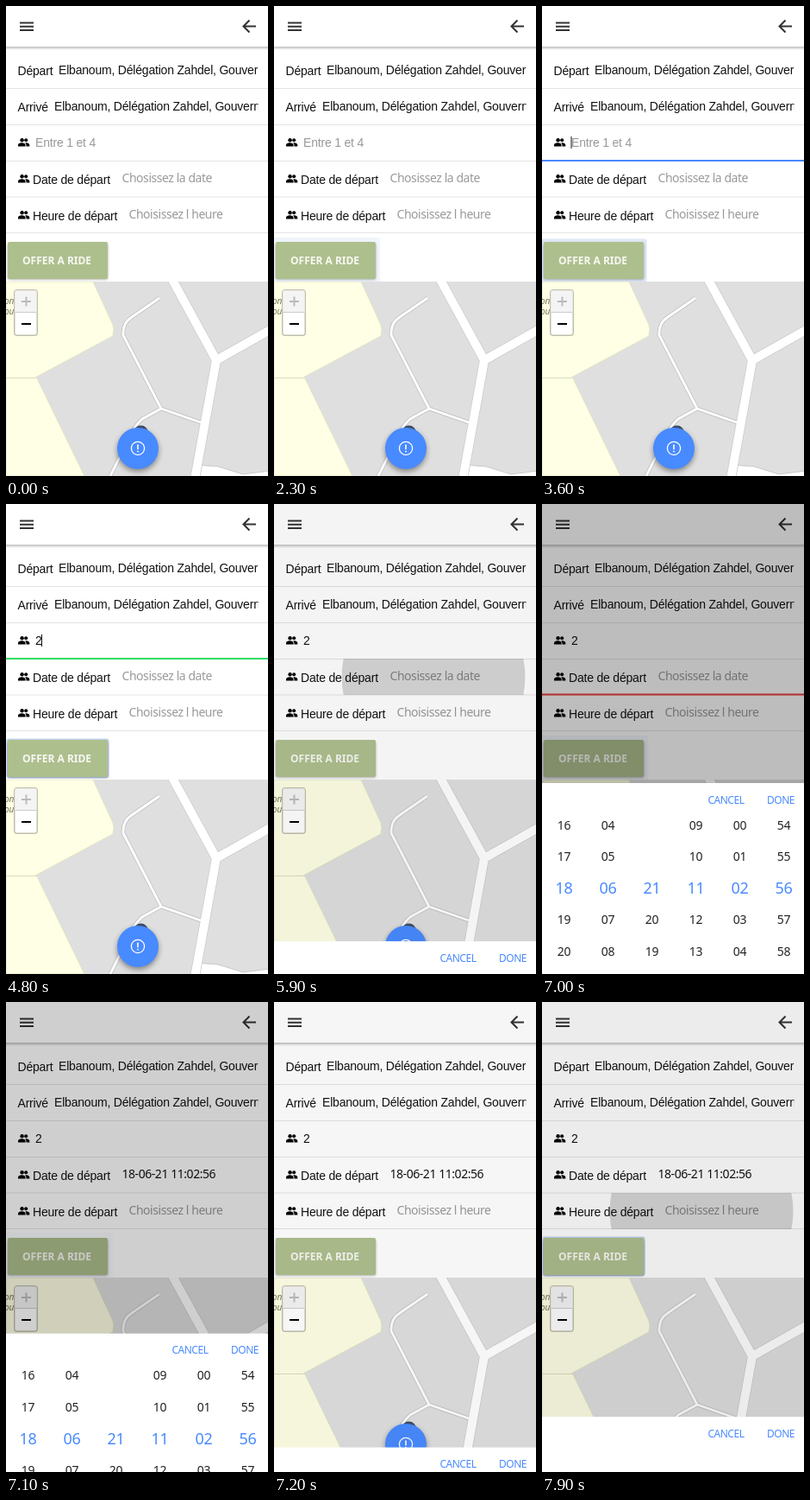
Write an HTML page that moves like this. It is 304 by 544 pixels and loops after 8000 ms.

```html
<!DOCTYPE html>
<html lang="fr">
<head>
<meta charset="utf-8">
<style>
html, body { margin: 0; width: 100%; height: 100%; overflow: hidden; background: #fff; }
svg { display: block; width: 304px; height: 544px; }
text { font: 14px "Liberation Sans", Arial, sans-serif; letter-spacing: -.2px; fill: #111; }
.noto { font: 14px "Noto Sans", sans-serif; letter-spacing: -.45px; }
.hint { fill: #999; }
.cmd { font: 500 12px "Noto Sans", sans-serif; letter-spacing: -.5px; fill: #488aff; }
.num { font: 14px "Noto Sans", sans-serif; text-anchor: middle; fill: #222; }
.num.on { font-size: 18px; font-weight: 500; fill: #488aff; }
.label { font: 600 12px "Noto Sans", sans-serif; letter-spacing: 0; fill: #f7f8f2; }
.place { font: italic 10px "Noto Sans", sans-serif; fill: #77775f; }
.road { fill: none; stroke-linejoin: round; }
</style>
</head>
<body>
<svg viewBox="0 0 304 544">
  <defs>
    <linearGradient id="fade" x2="0" y2="1">
      <stop stop-opacity=".26"/><stop offset="1" stop-opacity="0"/>
    </linearGradient>
    <filter id="soft" x="-30%" y="-30%" width="160%" height="160%"><feGaussianBlur stdDeviation="1.5"/></filter>
    <filter id="softer" x="-40%" y="-40%" width="180%" height="180%"><feGaussianBlur stdDeviation="3"/></filter>
    <clipPath id="field"><rect x="0" y="50" width="292.5" height="90"/></clipPath>
    <clipPath id="row4"><rect y="179" width="304" height="42"/></clipPath>
    <clipPath id="row5"><rect y="221" width="304" height="42"/></clipPath>
    <clipPath id="mapArea"><rect y="319" width="304" height="225"/></clipPath>
    <g id="people">
      <circle cx="4.6" cy="2.3" r="2.2"/><circle cx="9.2" cy="2.3" r="2"/>
      <path d="M0 9.5V8c0-3.8 8.6-3.8 8.6 0v1.5zM9.5 9.5V8q0-1.6-1.3-2.6c2.3-.4 5.1.4 5.1 2.4v1.7z"/>
    </g>
    <path id="lanes" d="M178 338L146 360Q135 367 136 381L180 466L226 482M180 466L158 478Q148 487 143 500L121 544"/>
    <path id="streets" d="M192 315L244 410L308 374M244 410L219 548"/>
  </defs>
  <rect width="304" height="544" fill="#fff"/>

  <g fill="none" stroke="#333" stroke-width="2">
    <path d="M16 19.5H32M16 23.8H32M16 28.1H32"/>
    <path d="M290 23.5H276M282.5 16.5L275.5 23.5L282.5 30.5"/>
  </g>
  <rect y="47" width="304" height="4" fill="url(#fade)"/>
  <path d="M0 95.5H304M0 137.5H304M0 179.5H304M0 221H304M0 262.5H304" stroke="#e4e4e4"/>

  <text x="13.5" y="80">Départ</text>
  <text x="13.5" y="122">Arrivé</text>
  <g clip-path="url(#field)">
    <text x="61" y="79">Elbanoum, Délégation Zahdel, Gouvernorat</text>
    <text x="56" y="121">Elbanoum, Délégation Zahdel, Gouvernorat</text>
  </g>
  <use href="#people" x="14" y="153"/>
  <use href="#people" x="14" y="195"/>
  <use href="#people" x="14" y="237"/>
  <text id="seats" x="34" y="163"></text>
  <path id="caret" d="M41.5 151V165" stroke="#111"/>
  <text x="31" y="206">Date de départ</text>
  <text id="date" x="134.5" y="204"></text>
  <text x="31" y="248">Heure de départ</text>
  <text class="noto hint" x="142.5" y="246">Choisissez l heure</text>
  <path id="seatLine" d="M0 179H304" stroke-width="2"/>
  <path id="dateLine" d="M0 220.5H304" stroke="#f53d3d" stroke-width="2"/>
  <g clip-path="url(#row4)"><circle id="dateTap" cx="185" cy="200"/></g>
  <g clip-path="url(#row5)"><circle id="hourTap" cx="185" cy="242"/></g>

  <rect id="glow" fill="#5a86d0" rx="3"/>
  <rect x="2" y="275" width="116" height="41.5" rx="2" opacity=".35" filter="url(#soft)"/>
  <rect x="2" y="273" width="116" height="43" rx="2" fill="#aebf8e"/>
  <text class="label" x="19" y="299">OFFER A RIDE</text>

  <g clip-path="url(#mapArea)">
    <rect y="319" width="304" height="225" fill="#dfdfdf"/>
    <path d="M0 319H101L124 369Q126 374 124 382L34 430L36 431L91 544H0Z" fill="#ffffe5" stroke="#dfe5c4"/>
    <path d="M0 430.5H35" stroke="#d9dfbc"/>
    <path d="M220 531L246 533L275 542L306 538V546H218Z" fill="#fff" stroke="#c9c9c9"/>
    <use href="#streets" class="road" stroke="#cacaca" stroke-width="11.5"/>
    <use href="#lanes" class="road" stroke="#c4c4c4" stroke-width="4.6"/>
    <use href="#streets" class="road" stroke="#fff" stroke-width="10"/>
    <use href="#lanes" class="road" stroke="#fff" stroke-width="2.8"/>
    <text class="place" x="-2" y="345">on</text>
    <text class="place" x="-2" y="357">ou</text>
    <rect x="9" y="328" width="28" height="54" rx="4" opacity=".25"/>
    <rect x="10.5" y="329.5" width="25" height="51" rx="2" fill="#fff"/>
    <path d="M10.5 329.5H35.5V354.5H10.5Z" fill="#f4f4f4"/>
    <path d="M10.5 354.5H35.5" stroke="#ccc"/>
    <path d="M18 342H29M23.5 336.5V347.5" stroke="#bbb" stroke-width="2"/>
    <path d="M18 368H29" stroke="#000" stroke-width="2"/>
    <circle cx="156.5" cy="494" r="8.5" fill="#40506a"/>
    <circle cx="153" cy="515" r="24" opacity=".4" filter="url(#softer)"/>
    <circle cx="153" cy="512" r="24" fill="#488aff"/>
    <g fill="none" stroke="#fff" stroke-width="1.3">
      <circle cx="153" cy="512" r="7.6"/>
      <path d="M153 507.5V513.3M153 514.8V516.5" stroke-width="1.6"/>
    </g>
  </g>

  <rect id="dim" width="304" height="544"/>
  <g id="picker">
    <rect width="304" height="222" fill="#fff"/>
    <text class="cmd" x="192.5" y="23.5">CANCEL</text>
    <text class="cmd" x="261" y="23.5">DONE</text>
    <g id="wheels"></g>
  </g>
</svg>
<script>
const $ = id => document.getElementById(id);
const set = (id, attrs) => { for (const k in attrs) $(id).setAttribute(k, attrs[k]); };
const clamp = x => Math.max(0, Math.min(1, x));
const PERIOD = 8000, PICKER = 221;

const picked = [18, 6, 21, 11, 2, 56];
$('wheels').innerHTML = picked.map((value, col) =>
  [-2, -1, 0, 1, 2].map(step => {
    const isYear = col === 2;
    if (isYear && step < 0) return '';
    const shown = String(isYear ? value - step : value + step).padStart(2, '0');
    const y = 121.5 + step * 36.5 + (step ? 5 : 6.5);
    return `<text class="num${step ? '' : ' on'}" x="${25.5 + col * 51}" y="${y}">${shown}</text>`;
  }).join('')).join('');

// cubic-bezier(.36, .66, .04, 1), solved by bisection
function ease(x) {
  if (x <= 0 || x >= 1) return clamp(x);
  const curve = (a, b, s) => 3 * a * s * (1 - s) ** 2 + 3 * b * s * s * (1 - s) + s ** 3;
  let lo = 0, hi = 1;
  for (let i = 0; i < 24; i++) {
    const mid = (lo + hi) / 2;
    if (curve(.36, .04, mid) < x) lo = mid; else hi = mid;
  }
  return curve(.66, 1, lo);
}

function ripple(id, dt) {
  set(id, { r: clamp(dt / 500) * 212, opacity: .16 * (1 - clamp((dt - 480) / 250)) });
}

function draw(t) {
  // seats field: focus, typing, blur
  const typed = t >= 4600, focused = t >= 3150 && t < 5500;
  $('seats').textContent = typed ? '2' : 'Entre 1 et 4';
  $('seats').setAttribute('class', typed ? '' : 'hint');
  const blinkOn = (t - (typed ? 4600 : 3200)) % 1000 < 500;
  set('caret', { opacity: focused && blinkOn ? 1 : 0, transform: `translate(${typed ? 0 : -7.5} 0)` });
  set('seatLine', {
    stroke: typed ? '#32db64' : '#488aff',
    opacity: clamp((t - 3150) / 200) * (1 - clamp((t - 5400) / 150))
  });

  // date field
  const chosen = t >= 7060;
  $('date').textContent = chosen ? '18-06-21 11:02:56' : 'Chosissez la date';
  $('date').setAttribute('class', chosen ? 'noto' : 'noto hint');
  set('dateLine', { opacity: chosen ? 0 : clamp((t - 6250) / 200) });
  ripple('dateTap', t - 5650);
  ripple('hourTap', t - 7650);

  // expanding button pulse
  const p = t < 2300 ? 1 : clamp((t - 1600) % 1550 / 950);
  const spread = 1 + 5.5 * p;
  set('glow', {
    x: 2 - spread, y: 273 - spread, width: 116 + 2 * spread, height: 43 + 2 * spread,
    opacity: .4 * (1 - p) ** 1.1
  });

  // picker sheet and backdrop
  const open = ease((t - 5868) / 400) - ease((t - 7052) / 400) + ease((t - 7850) / 400);
  set('dim', { opacity: .26 * open });
  set('picker', { transform: `translate(0 ${544 - PICKER * open})` });
  set('wheels', { opacity: t < 7600 ? 1 : 0 });
}

const start = performance.now();
function tick() {
  draw((performance.now() - start) % PERIOD);
  requestAnimationFrame(tick);
}
tick();
</script>
</body>
</html>
```
